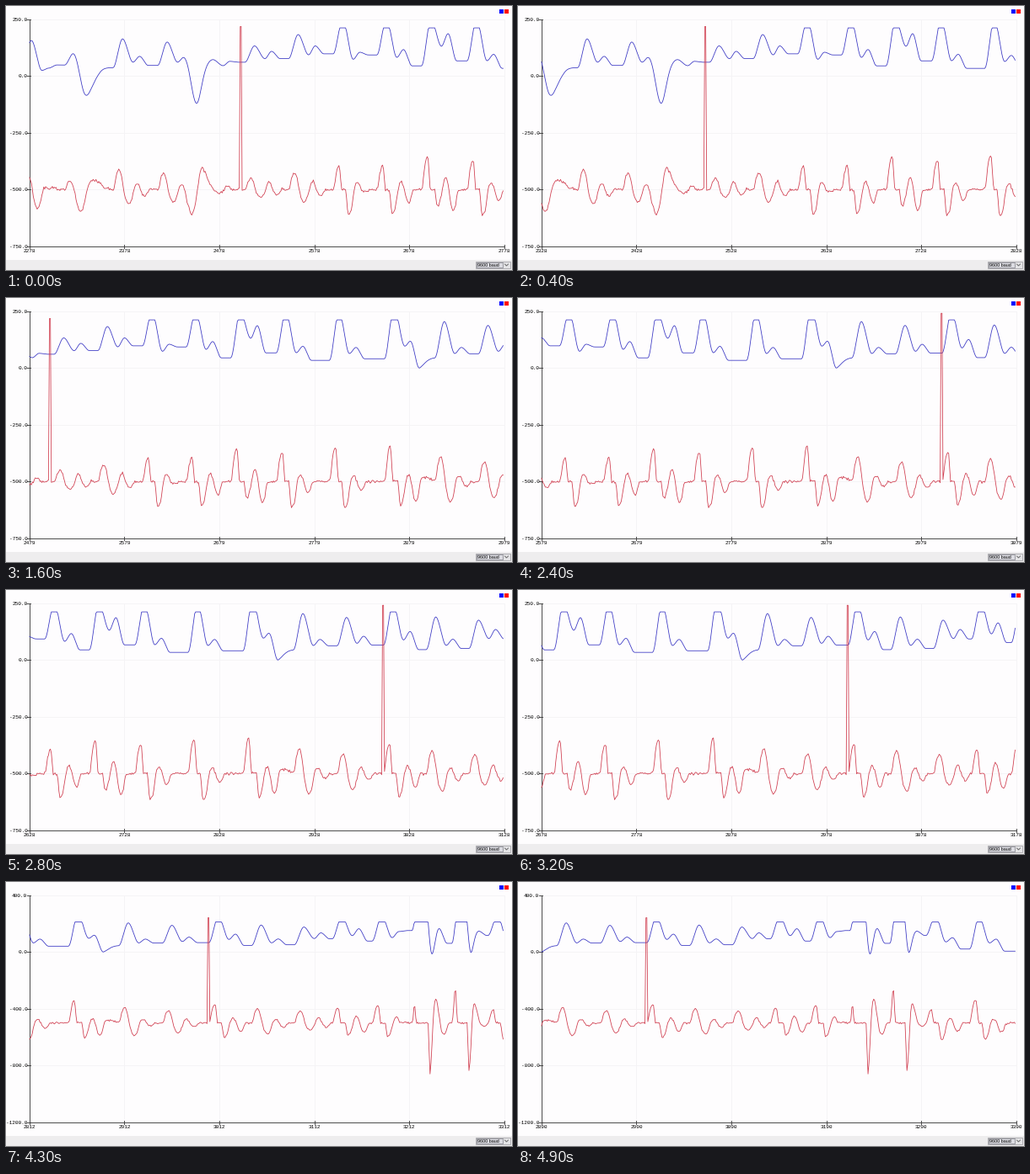
A matplotlib script that plays this animation: 600 px wide and 314 px high, repeating every 5000 ms.

```python
import matplotlib.pyplot as plt
import numpy as np
from matplotlib.animation import FuncAnimation
from matplotlib.patches import Rectangle

WIDTH, HEIGHT, DPI = 600, 314, 100
FRAMES, INTERVAL = 50, 100
LEFT, RIGHT, TOP, BOTTOM = 27.9, 590.6, 15.5, 285.9
ZERO_Y = TOP + (BOTTOM - TOP) / 4
FIRST, LAST, WINDOW = 2278, 3390, 500
STEP = (RIGHT - LEFT) / WINDOW
CEILING = 211
BLUE, RED, INK, GRID = "#3a37c4", "#d03c4e", "#3c3c3c", "#f5f3f6"

# Heartbeats: sample of the peak, peak, echo and foot levels.
BEATS = [
    (2280, 156, 34, 60), (2325, 112, 50, 48), (2376, 163, 86, 36),
    (2423, 149, 86, 46), (2471, 72, 64, 54), (2515, 132, 108, 60),
    (2561, 182, 132, 76), (2608, 250, 104, 97), (2654, 250, 116, 92),
    (2701, 250, 186, 44), (2749, 250, 95, 66), (2805, 250, 90, 33),
    (2863, 270, 150, 40), (2916, 204, 90, 45), (2962, 187, 104, 62),
    (3011, 250, 125, 65), (3056, 189, 91, 45), (3101, 175, 134, 50),
    (3141, 250, 163, 92), (3183, 255, 143, 76), (3225, 600, 171, 150),
    (3267, 560, 147, 60), (3305, 255, 100, 115), (3351, 250, 90, 20),
    (3400, 60, 60, 5),
]
# Downward swings: sample, depth, spread.
DIPS = [(2339, 125, 7), (2454, 175, 5), (2887, 50, 7), (3236, 135, 3), (3276, 125, 3)]
SPIKES = {2500: 217, 3000: 240}


def ease_through(points, t):
    """Curve that eases in and out between neighbouring points."""
    x, y = np.array(points, float).T
    i = np.clip(np.searchsorted(x, t, side="right") - 1, 0, len(x) - 2)
    u = np.clip((t - x[i]) / (x[i + 1] - x[i]), 0, 1)
    return y[i] + (y[i + 1] - y[i]) * u * u * (3 - 2 * u)


def heartbeat(t):
    """Each beat rises from its foot, falls to a notch, echoes and rests."""
    points = []
    for (at, peak, echo, foot), following in zip(BEATS, BEATS[1:]):
        points += [(at - 10, foot), (at, peak), (at + 11, 0.7 * echo),
                   (at + 18, echo), (at + 27, following[3])]
    wave = ease_through(points, t)
    for at, depth, spread in DIPS:
        wave -= depth * np.exp(-0.5 * ((t - at) / spread) ** 2)
    return np.minimum(wave, CEILING)


samples = np.arange(FIRST, LAST + 1)
pulse = heartbeat(samples)
rng = np.random.default_rng(4)
lagged = heartbeat(samples - 2.0)
slope = -500 + 2.3 * (pulse - lagged) + rng.normal(0, 3, samples.size)
for at, height in SPIKES.items():
    slope[at - FIRST:at - FIRST + 2] = height

fig = plt.figure(figsize=(WIDTH / DPI, HEIGHT / DPI), dpi=DPI, facecolor="#fefdfe")
ax = fig.add_axes([0, 0, 1, 1])
ax.set(xlim=(0, WIDTH), ylim=(HEIGHT, 0))
ax.axis("off")


def px(size):
    return size * 72 / DPI


def stroke(xs, ys, color, width=0.9, **style):
    return ax.plot(xs, ys, color=color, lw=px(width), **style)[0]


def box(x, y, w, h, fill, edge="none"):
    ax.add_patch(Rectangle((x, y), w, h, fc=fill, ec=edge, lw=px(0.8), zorder=3))


def label(x, y, text="", size=6.1, ha="center", font="Liberation Mono"):
    return ax.text(x, y, text, fontsize=px(size), family=font, color="black",
                   ha=ha, va="center_baseline", zorder=5)


x_ticks = np.linspace(LEFT, RIGHT, 6)
y_ticks = np.linspace(TOP, BOTTOM, 5)
for x in x_ticks:
    stroke([x, x], [TOP, BOTTOM], GRID, zorder=1)
    stroke([x, x], [BOTTOM - 2, BOTTOM + 2], INK, zorder=2)
for y in y_ticks:
    stroke([LEFT, RIGHT], [y, y], GRID, zorder=1)
    stroke([LEFT - 2.5, LEFT + 1], [y, y], INK, zorder=2)
stroke([LEFT, LEFT], [TOP, BOTTOM], INK, zorder=2)
stroke([LEFT, RIGHT], [BOTTOM, BOTTOM], INK, zorder=2)
x_labels = [label(x, 291) for x in x_ticks]
y_labels = [label(25.3, y, ha="right") for y in y_ticks]

box(585.3, 4, 4.7, 5, "#0000ff")
box(591, 4, 4.7, 5, "#ff0000")

# Status bar with the speed selector.
box(0, 301.8, WIDTH, 13, "#eeedee")
box(557, 303.8, 40.5, 8, "#e3e3e5", "#a2a2a6")
box(558, 304.8, 30.5, 6, "#dcdce2", "#8a8a92")
label(558.8, 307.9, "9600 baud", 5.4, "left", "Liberation Sans")
stroke([591.5, 593.5, 595.5], [307, 309, 307], "#555555", 0.8, zorder=5)

blue_line = stroke([], [], BLUE, 0.8, zorder=4)
red_line = stroke([], [], RED, 0.8, zorder=4)


def update(frame):
    start = int(round(np.interp(frame, [0, 9, 16, 24, 32, 43, 49],
                                [2278, 2390, 2479, 2579, 2678, 2812, 2890])))
    view = slice(start - FIRST, start - FIRST + WINDOW)
    step = 400 if slope[view].min() < -750 else 250
    scale = (BOTTOM - TOP) / (4 * step)
    xs = LEFT + (samples[view] - start) * STEP
    blue_line.set_data(xs, ZERO_Y - pulse[view] * scale)
    red_line.set_data(xs, ZERO_Y - slope[view] * scale)
    for i, text in enumerate(x_labels):
        text.set_text(str(start + 100 * i))
    for i, text in enumerate(y_labels):
        text.set_text(f"{step * (1 - i):.1f}")
    return [blue_line, red_line, *x_labels, *y_labels]


animation = FuncAnimation(fig, update, frames=FRAMES, interval=INTERVAL,
                          repeat=True, repeat_delay=0)
plt.show()
```
